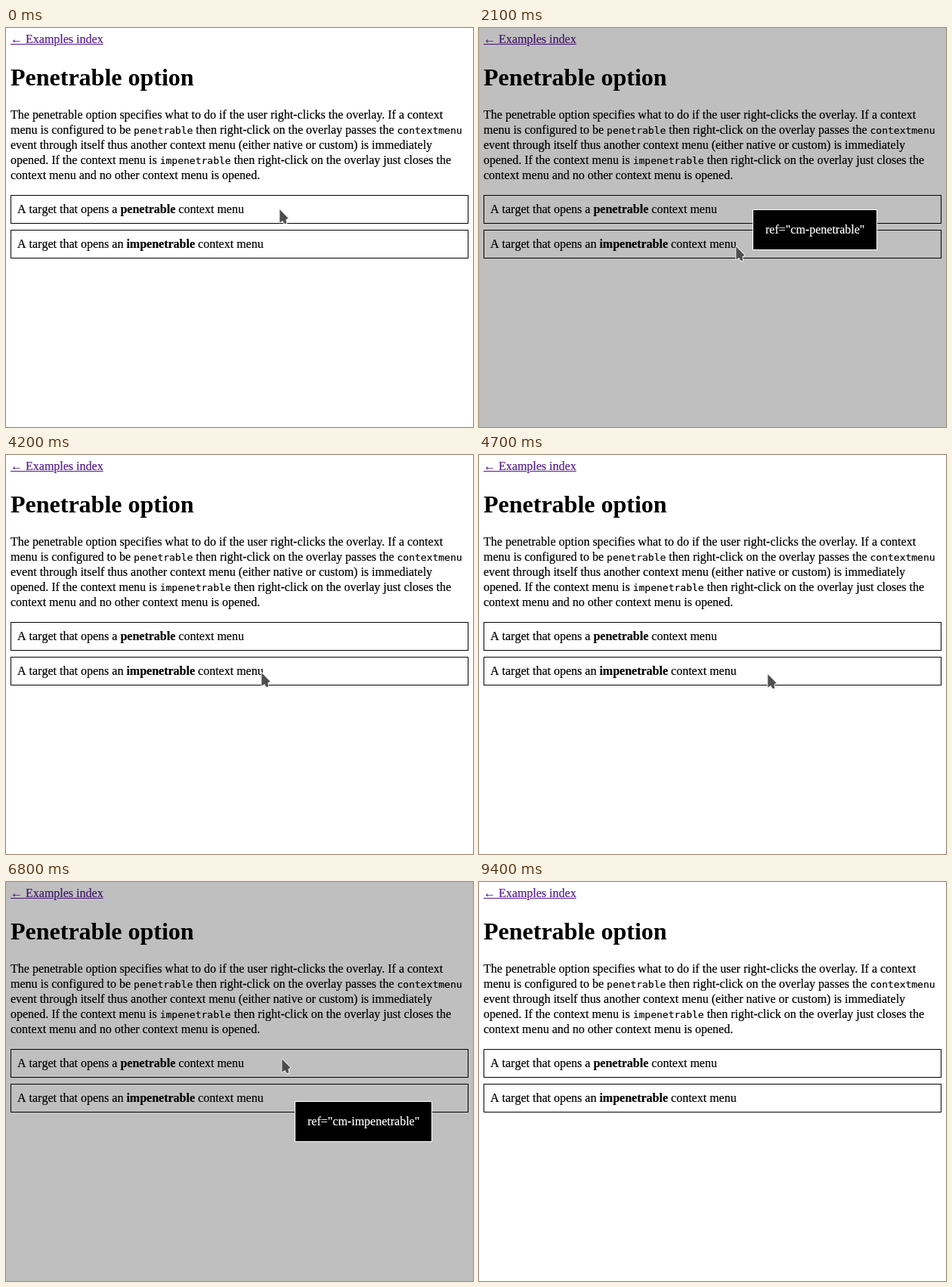
Recreate the animation shown at these times as an HTML page. Size 618 px wide and 528 px high, loop 9.6 s.

```html
<!DOCTYPE html>
<html lang="en">
<head>
<meta charset="utf-8">
<title>Penetrable option</title>
<style>
html, body { margin: 0; width: 100%; height: 100%; overflow: hidden; background: #fff; }
#stage {
  position: absolute; left: 0; top: 0; width: 618px; height: 528px; overflow: hidden;
  font: 16px/20px "Liberation Serif", "Times New Roman", serif; color: #000;
  -webkit-text-stroke: .2px; white-space: nowrap; cursor: default;
}
#stage > * { position: absolute; margin: 0; box-sizing: border-box; }
.link { left: 6px; top: 5px; color: #551a8b; text-decoration: underline; }
h1 { left: 6px; top: 45px; font-size: 32px; line-height: 40px; -webkit-text-stroke: 0; }
p { left: 6px; top: 105px; }
code { font: 13px/1 "DejaVu Sans Mono", monospace; }
.box {
  left: 6px; width: 606px; height: 38px; border: 1px solid #000; padding: 8px;
  font-kerning: none;
}
#shade { left: 0; top: 0; width: 618px; height: 528px; background: rgba(0, 0, 0, .25); }
#menu { height: 54px; padding: 16px; border: 1px solid #fff; background: #000; color: #fff; }
#pointer { left: 0; top: 0; width: 16px; height: 24px; overflow: visible; }
#pointer path {
  fill: #4d4d4d; stroke: #fff; stroke-width: 1.8; stroke-linejoin: round; paint-order: stroke;
  filter: drop-shadow(0 .5px .6px rgba(0, 0, 0, .25));
}
</style>
</head>
<body>
<div id="stage">
  <span class="link">← Examples index</span>
  <h1>Penetrable option</h1>
  <p>The penetrable option specifies what to do if the user right-clicks the overlay. If a context<br>
  menu is configured to be <code>penetrable</code> then right-click on the overlay passes the <code>contextmenu</code><br>
  event through itself thus another context menu (either native or custom) is immediately<br>
  opened. If the context menu is <code>impenetrable</code> then right-click on the overlay just closes the<br>
  context menu and no other context menu is opened.</p>
  <div class="box" style="top:221px">A target that opens a <b>penetrable</b> context menu</div>
  <div class="box" style="top:267px">A target that opens an <b>impenetrable</b> context menu</div>
  <div id="shade"></div>
  <div id="menu"></div>
  <svg id="pointer"><path d="M.3 .3V17.4L4.2 15L6.2 18.8H9.2L8.4 13.4L11.5 11.7Z"/></svg>
</div>
<script>
const LOOP = 9600, STEP = 100;
const $ = id => document.getElementById(id);
const shade = $('shade'), menu = $('menu'), pointer = $('pointer');

const smooth = f => f * f * (3 - 2 * f);
const speedUp = f => f ** 1.4;

// Pointer moves: first step time, number of steps, end point, easing
const home = [362, 240];
const moves = [
  [1700, 4, [339, 291], smooth],
  [2100, 1, [340, 289]],
  [3900, 1, [338, 288]],
  [4500, 1, [335, 281]],
  [4600, 1, [383, 293]],
  [4700, 1, [382, 290]],
  [6200, 7, [365, 234], smooth],
  [8600, 1, [366, 236]],
  [8700, 7, [79, 3], speedUp],
  [9400, 1, [60, -60]]
];

// Menus: open time, close time, position, name
const menus = [
  [1100, 3000, 362, 240, 'cm-penetrable'],
  [3000, 4200, 340, 289, 'cm-impenetrable'],
  [5700, 7300, 382, 290, 'cm-impenetrable']
];

function pointerAt(t) {
  let pos = home;
  for (const [start, steps, end, ease = f => f] of moves) {
    if (t < start) break;
    const done = Math.min(steps, Math.floor((t - start) / STEP) + 1);
    const f = ease(done / steps);
    pos = pos.map((v, i) => Math.round(v + (end[i] - v) * f));
  }
  return pos;
}

function draw(t) {
  const open = menus.find(([from, to]) => t >= from && t < to);
  shade.style.display = menu.style.display = open ? 'block' : 'none';
  if (open) {
    const [, , x, y, name] = open;
    menu.style.left = x + 'px';
    menu.style.top = y + 'px';
    menu.textContent = `ref="${name}"`;
  }
  const [x, y] = pointerAt(t);
  pointer.style.transform = `translate(${x}px, ${y}px)`;
}

const begin = performance.now();
function tick() {
  draw((performance.now() - begin) % LOOP);
  requestAnimationFrame(tick);
}
tick();
</script>
</body>
</html>
```
